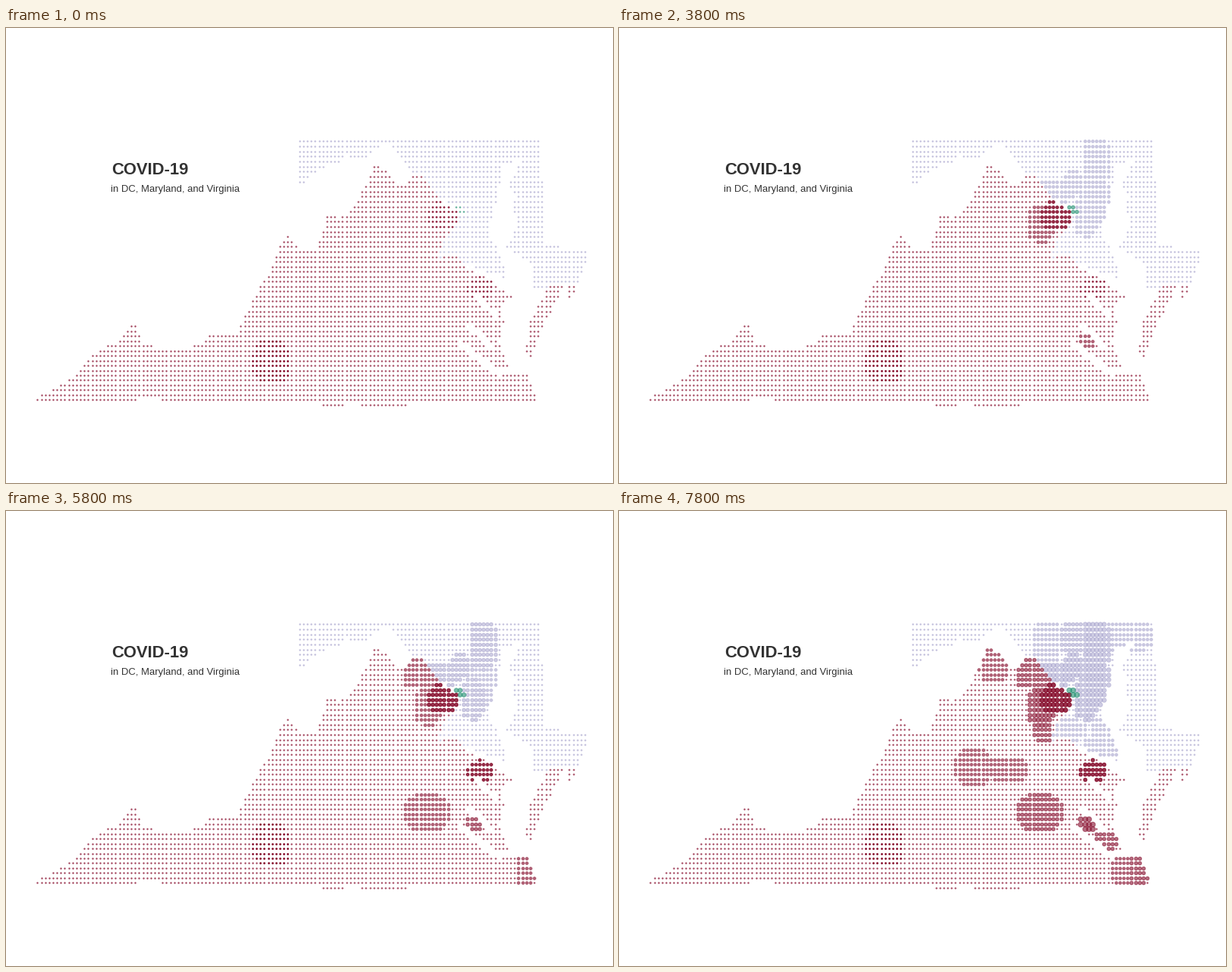
A matplotlib script that plays this animation: 800x600 px, repeating every 8000 ms.

```python
import numpy as np
import matplotlib.pyplot as plt
from matplotlib.animation import FuncAnimation
from matplotlib.path import Path

W, H, DPI = 800, 600, 100
PX = 72 / DPI                 # points per pixel
STEP, FRAMES = 100, 80        # ms per frame, frames per loop
FIRST, DAY, LAST = 500, 400, 18   # ms of day 0, ms per day, final day
BASE, EDGE = 0.8, 0.9         # radius and outline of a dot without cases

RED, LILAC, GREEN = "#850a2a", "#9e9ac8", "#1f8f6f"

# Borders in stage pixels
VIRGINIA = [
    (30, 494), (96, 455), (112, 430), (150, 411), (169, 388), (177, 412),
    (193, 420), (242, 420), (264, 412), (265, 404), (304, 402), (322, 364),
    (348, 318), (364, 281), (370, 271), (385, 291), (406, 291), (421, 257),
    (422, 246), (442, 250), (463, 229), (478, 196), (483, 180), (492, 180),
    (516, 207), (528, 203), (538, 193), (549, 193), (574, 229), (595, 240),
    (595, 257), (575, 277), (569, 303), (594, 299), (605, 315), (634, 330),
    (668, 354), (650, 366), (656, 386), (648, 413), (662, 447), (642, 450),
    (652, 461), (657, 455), (688, 455), (699, 494), (530, 494), (528, 500),
    (467, 500), (467, 494), (447, 494), (445, 500), (416, 500), (416, 494),
    (203, 494), (200, 487), (173, 487), (172, 494),
]
SHORE = [(718, 338), (736, 338), (709, 390), (693, 434), (684, 430), (690, 386),
         (706, 355)]
ISLAND = [(742, 338), (750, 338), (747, 357), (740, 357)]
MARYLAND = [
    (384, 146), (704, 146), (704, 200), (709, 206), (710, 286), (767, 292),
    (767, 300), (754, 338), (719, 344), (695, 344), (694, 312), (658, 288),
    (668, 270), (674, 252), (664, 238), (674, 222), (662, 206), (675, 180),
    (689, 168), (681, 173), (653, 180), (648, 224), (637, 255), (637, 275),
    (653, 301), (658, 331), (601, 309), (586, 298), (580, 305), (569, 305),
    (571, 286), (593, 262), (597, 248), (606, 243), (600, 233), (574, 228),
    (550, 197), (536, 192), (521, 169), (504, 153), (495, 153), (484, 163),
    (473, 171), (454, 171), (450, 165), (438, 177), (411, 187), (389, 206),
    (384, 206),
]
DISTRICT = [(590, 233), (600, 233), (606, 240), (606, 245), (596, 245)]
RIVERS = [((620, 354), (646, 380)), ((611, 392), (640, 421)), ((598, 416), (642, 450))]

# Counties as ellipses: centre x, y, half width, half height, day of first cases
VA_COUNTIES = [
    (617, 411, 12, 13, 2), (576, 248, 21, 21, 3), (556, 257, 18, 27, 8),
    (545, 214, 24, 21, 9), (554, 397, 31, 25, 10), (684, 475, 14, 20, 11),
    (624, 342, 17, 14, 12), (558, 290, 14, 15, 14), (645, 433, 18, 13, 14),
    (467, 338, 26, 26, 16), (662, 475, 15, 20, 16), (514, 340, 25, 19, 18),
    (493, 203, 20, 24, 18),
]
MD_COUNTIES = [
    (579, 213, 25, 17, 3), (615, 248, 16, 28, 3), (629, 175, 20, 34, 7),
    (600, 204, 16, 16, 7), (632, 228, 19, 30, 8), (598, 167, 16, 24, 14),
    (670, 165, 34, 22, 15), (592, 289, 24, 15, 15), (564, 174, 20, 30, 16),
    (634, 284, 14, 14, 16), (634, 312, 26, 18, 18),
]
# Overlapping jurisdictions draw their dots more than once
OVERLAPS = [(576, 248, 21, 21, 1), (624, 342, 17, 14, 1), (349, 440, 25, 31, 2)]

# Dot lattice, rows slightly closer to the south
col, row = np.meshgrid(np.arange(142), np.arange(54))
X = np.round(36.22 + 5.155 * col).ravel()
Y = np.round(149.4 + 6.66 * row - 0.002 * row**2).ravel()


def inside(outline):
    path = Path(outline + outline[:1], closed=True)
    return path.contains_points(np.column_stack([X, Y]))


def ellipse(cx, cy, rx, ry):
    return abs((X - cx) / rx) ** 2.5 + abs((Y - cy) / ry) ** 2.5 <= 1


def near(a, b, width=4):
    """Dots within a given distance of the segment a-b."""
    (ax_, ay), (bx, by) = a, b
    dx, dy = bx - ax_, by - ay
    s = np.clip(((X - ax_) * dx + (Y - ay) * dy) / (dx**2 + dy**2), 0, 1)
    return np.hypot(X - ax_ - s * dx, Y - ay - s * dy) < width


def onset(counties):
    """Day of first cases per dot; infinite where there are none."""
    day = np.full(X.shape, np.inf)
    for *shape, start in counties:
        day[np.isinf(day) & ellipse(*shape)] = start
    return day


def size(day, start):
    """Radius on a day: a jump at the onset, then accelerating growth."""
    if day < start:
        return BASE
    gain = 1.5 * (1 - start / LAST)
    p = (day - start) / max(LAST - start, 1)
    return BASE + 1 + gain * p**2


def radius(t, start):
    day, rest = divmod(t - FIRST, DAY)
    ease = 0.8 if rest < STEP else 1
    prev, cur = size(day - 1, start), size(day, start)
    grown = prev + (cur - prev) * ease - BASE
    return BASE + round(2 * grown) / 2


in_dc = inside(DISTRICT)
in_va = inside(VIRGINIA)
for bank in RIVERS:
    in_va &= ~near(*bank)
in_va = (in_va | inside(SHORE) | inside(ISLAND)) & ~in_dc
in_md = inside(MARYLAND) & ~in_va & ~in_dc

copies = np.ones(X.shape, int)
for *shape, extra in OVERLAPS:
    copies[in_va & ellipse(*shape)] += extra

fig = plt.figure(figsize=(W / DPI, H / DPI), dpi=DPI, facecolor="white")
ax = fig.add_axes([0, 0, 1, 1])
ax.set_xlim(0, W)
ax.set_ylim(H, 0)
ax.axis("off")


def dots(mask, start, color, alpha):
    idx = np.repeat(np.flatnonzero(mask), copies[mask])
    art = ax.scatter(X[idx] + 0.5, Y[idx] + 0.5, s=1, c=color, edgecolors=color,
                     linewidths=EDGE * PX, alpha=alpha)
    return art, start[idx]


layers = [
    dots(in_md, onset(MD_COUNTIES), LILAC, 0.5),
    dots(in_va, onset(VA_COUNTIES), RED, 0.6),
    dots(in_dc, np.zeros(X.shape), GREEN, 0.6),
]


def label(x, y, text, px, weight):
    ax.text(x, y, text, family="Liberation Sans", weight=weight, size=px * PX,
            color="#333333", va="baseline")


label(139.5, 193, "COVID-19", 22, "bold")
label(138, 216, "in DC, Maryland, and Virginia", 13, "normal")


def update(i):
    for art, start in layers:
        days, which = np.unique(start, return_inverse=True)
        r = np.array([radius(i * STEP, d) if np.isfinite(d) else BASE for d in days])
        art.set_sizes((2 * r[which] * PX) ** 2)
    return [art for art, _ in layers]


anim = FuncAnimation(fig, update, frames=FRAMES, interval=STEP, repeat=True,
                     repeat_delay=0, blit=False)
plt.show()
```
